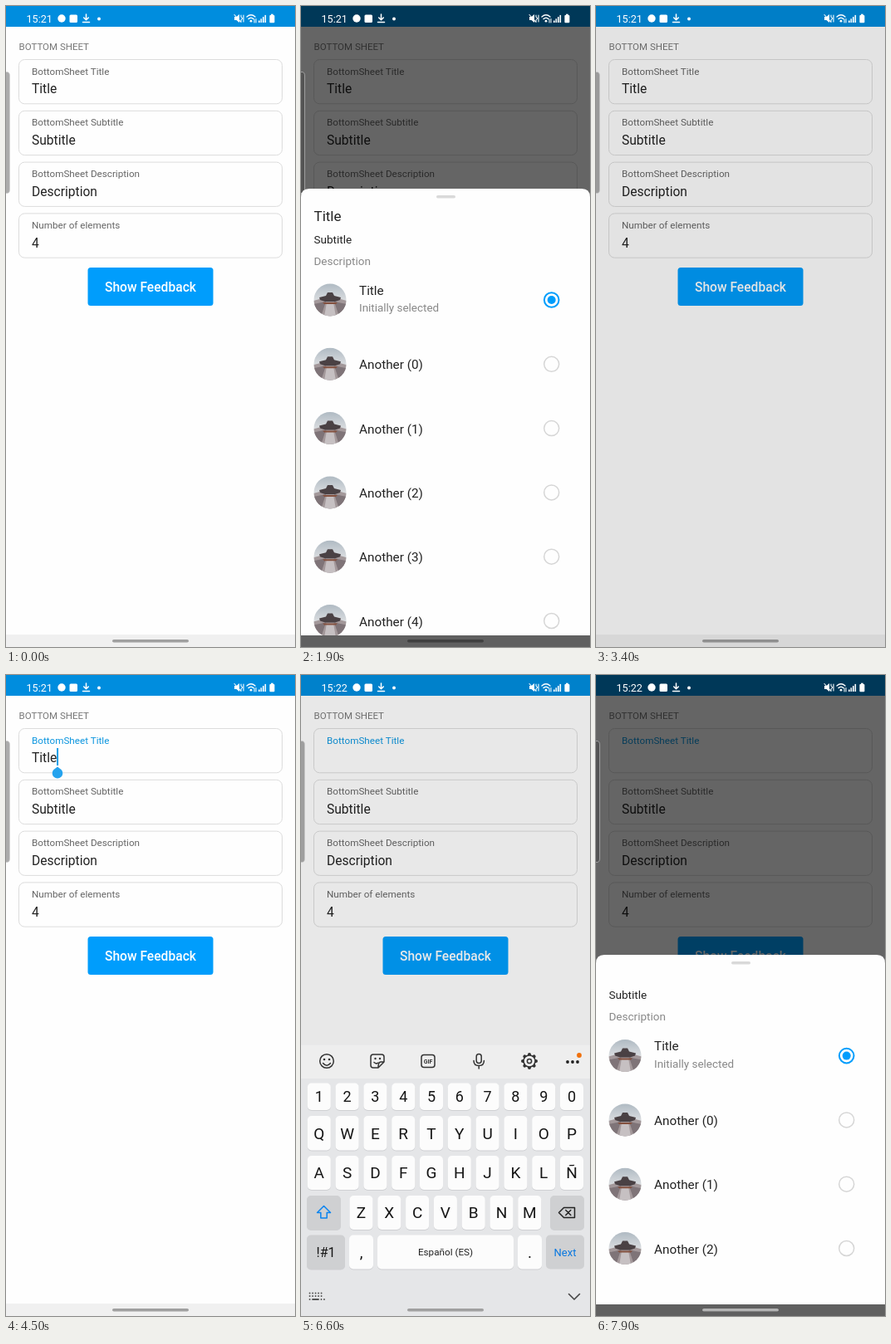
These frames come from a looping animation (348 by 772 pixels, 8 s). An HTML page:

```html
<!DOCTYPE html>
<html lang="en">
<head>
<meta charset="utf-8">
<title>Bottom sheet demo</title>
<style>
  html, body { margin: 0; width: 100%; height: 100%; overflow: hidden; background: #fefefe; }
  svg { display: block; width: 100vw; height: 100vh; font-family: Roboto, "Noto Sans", sans-serif; }
  .line { fill: none; stroke-linecap: round; stroke-linejoin: round; }
  .caps .letter { text-transform: uppercase; }
</style>
</head>
<body>
<svg id="stage" viewBox="0 0 348 772"></svg>
<script>
const LOOP = 8000;
const BLUE = '#009dfc';
const NAV_TOP = 758;

// Markup helpers; text is placed by the vertical centre of its capitals.
const text = (x, cy, size, str, fill = '#222', extra = '') =>
  `<text x="${x}" y="${cy + size * 0.36}" font-size="${size}" fill="${fill}" ${extra}>${str}</text>`;
const middle = (x, cy, size, str, fill, extra = '') =>
  text(x, cy, size, str, fill, `text-anchor="middle" ${extra}`);
const rect = (x, y, w, h, r, fill, extra = '') =>
  `<rect x="${x}" y="${y}" width="${w}" height="${h}" rx="${r}" fill="${fill}" ${extra}/>`;
const dot = (x, y, r, fill, extra = '') =>
  `<circle cx="${x}" cy="${y}" r="${r}" fill="${fill}" ${extra}/>`;
const line = (d, stroke, width = 1.5, extra = '') =>
  `<path class="line" d="${d}" stroke="${stroke}" stroke-width="${width}" ${extra}/>`;
const group = (id, body, extra = '') => `<g id="${id}" ${extra}>${body}</g>`;

function field(label, value, index) {
  const y = 64.5 + index * 61.8;
  return rect(15.5, y, 317, 53.3, 7, '#fefefe', 'stroke="#dcdcdc"') +
    text(31, y + 13.8, 11.7, label, '#666', `id="label${index}"`) +
    text(31, y + 35, 15.6, value, '#222', `id="value${index}"`);
}

function page() {
  const fields = [['BottomSheet Title', 'Title'], ['BottomSheet Subtitle', 'Subtitle'],
    ['BottomSheet Description', 'Description'], ['Number of elements', '4']];
  return rect(0, 0, 348, 772, 0, '#fefefe') +
    rect(0, 0, 348, 25, 0, '#008dde') +
    text(15.5, 49, 11.5, 'BOTTOM SHEET', '#777') +
    fields.map(([label, value], i) => field(label, value, i)).join('') +
    rect(98.5, 315, 151, 46, 3.5, BLUE) +
    middle(174, 338.5, 15.6, 'Show Feedback', '#fff', 'font-weight="500"') +
    group('cursor', rect(0, 88, 2, 21, 0, '#1b9fe8')) +
    group('handle', '<path d="M62 110.5L66.6 114A6.3 6.3 0 1 1 57.4 114Z" fill="#25a3ee"/>') +
    rect(0, NAV_TOP - 1, 348, 15, 0, '#f0f0f0');
}

const avatar = `<g id="avatar"><g clip-path="url(#round)">
  ${rect(-20, -20, 40, 40, 0, 'url(#sky)')}
  <path d="M-20 1L-9-2H9L20 1V20H-20Z" fill="#a3989a"/>
  <path d="M-20 5L-5 2L-11 20H-20ZM20 5L5 2L11 20H20Z" fill="#7f7478"/>
  <path d="M-13-3L-5-5L-3-9H3L5-5L13-3L12 0L6 2H-6L-12 0Z" fill="#4a4144"/>
  <path d="M-4 3H4L7 20H-7Z" fill="#c6c0c2"/>
  <path d="M-9 3L9 3L7 5H-7Z" fill="#84513f"/></g></g>`;

function row(index, cy) {
  const selected = index === 0;
  return `<use href="#avatar" x="35" y="${cy}"/>` + (selected
    ? text(70, cy - 12, 15.3, 'Title') + text(70, cy + 9.5, 13.45, 'Initially selected', '#888') +
      dot(301.7, cy, 8.8, 'none', `stroke="${BLUE}" stroke-width="2"`) + dot(301.7, cy, 5, BLUE)
    : text(70, cy + 0.5, 15.3, `Another (${index - 1})`) +
      dot(301.7, cy, 9, 'none', 'stroke="#d6d6d6" stroke-width="1.5"'));
}

function sheet(id, title, rowCount) {
  const shift = title ? 0 : -12.4;
  let body = '<path d="M0 10Q0 0 10 0H338Q348 0 348 10V560H0Z" fill="#fefefe"/>' +
    rect(163, 8, 23, 3.6, 1.8, '#d9d9d9') +
    text(15.5, 32.5, 17, title) +
    text(15.5, 61 + shift, 13.5, 'Subtitle') +
    text(15.5, 87 + shift, 13.5, 'Description', '#888');
  for (let i = 0; i < rowCount; i++) body += row(i, 134 + shift + i * 77.3);
  return `<g clip-path="url(#aboveNav)">${group(id, body)}</g>`;
}

function key(cx, y, w, h, label, size = 19, fill = '#fcfcfc', color = '#151515', extra = '') {
  return rect(cx - w / 2, y + 1, w, h, 5, '#cfd0d3') + rect(cx - w / 2, y, w, h, 5, fill, extra) +
    middle(cx, y + h / 2, size, label, color, 'class="letter"');
}

function toolbar() {
  const ink = '#333';
  const gear = Array.from({ length: 8 }, (_, i) =>
    `<path class="line" d="M0-7V-8" stroke="${ink}" stroke-width="4" transform="translate(275 465) rotate(${i * 45})"/>`).join('');
  return dot(31, 465, 8.3, 'none', `stroke="${ink}" stroke-width="1.5"`) +
    dot(28, 463, 1.3, ink) + dot(34, 463, 1.3, ink) + line('M26.5 467.5Q31 473 35.5 467.5', ink) +
    line('M87 457H97Q100 457 100 460V466L93 473H87Q84 473 84 470V460Q84 457 87 457ZM100 466H96Q93 466 93 473', ink) +
    dot(89.5, 462, 1.2, ink) + dot(95, 462, 1.2, ink) + line('M88 466.5Q91 469 93 467', ink) +
    rect(145, 457.5, 16, 15, 3, 'none', `stroke="${ink}" stroke-width="1.5"`) +
    middle(153, 465, 7, 'GIF', ink, 'font-weight="700"') +
    rect(211.2, 456.5, 6, 11, 3, 'none', `stroke="${ink}" stroke-width="1.5"`) +
    line('M208 464.5Q208 470.5 214.2 470.5T220.4 464.5M214.2 470.5V474', ink) +
    gear + dot(275, 465, 7, '#eee', `stroke="${ink}" stroke-width="1.5"`) +
    dot(275, 465, 2.6, 'none', `stroke="${ink}" stroke-width="1.5"`) +
    dot(335, 458, 2.9, '#f0700c');
}

function keyboard() {
  const gray = '#cfd0d2';
  const column = i => 21.8 + i * 33.8;
  const keys = (letters, first, y, h, size) => [...letters]
    .map((c, i) => key(column(i + first), y, 28, h, c, size)).join('');
  return rect(0, 445.5, 348, 330, 0, '#e5e6e8') + rect(0, 445.5, 348, 40.5, 0, '#eeeeee') +
    group('suggestions', line('M24 458L16 466L24 474', '#222', 1.6) +
      ['Título', 'Titular', 'Titulo'].map((word, i) => middle(86 + i * 88, 466, 16.4, word)).join('')) +
    group('toolbar', toolbar()) +
    [321, 327, 333].map(x => dot(x, 466, 1.9, '#222')).join('') +
    keys('1234567890', 0, 491.5, 32.5, 18) +
    keys('qwertyuiop', 0, 531, 41.5) +
    keys('asdfghjklñ', 0, 579, 41) +
    key(27.5, 627, 41, 41, '', 1, gray) +
    line('M27.5 639.5L35.5 647.5H31.2V654H23.8V647.5H19.5Z', '#222', 1.5, 'id="shift"') +
    keys('zxcvbnm', 1.5, 627, 41) +
    key(320.5, 627, 41, 41, '', 1, gray, '', 'id="backspace"') +
    line('M316.5 641.5H329.5V653.5H316.5L310.5 647.5ZM318.8 644.5L324.8 650.5M324.8 644.5L318.8 650.5', '#222') +
    key(30, 674.5, 46, 41, '!#1', 16, gray) +
    key(72.5, 674.5, 29, 41, ',') +
    rect(92, 675.5, 164, 41, 5, '#cfd0d3') + rect(92, 674.5, 164, 41, 5, '#fcfcfc') +
    middle(174, 695, 11.7, 'Español (ES)', '#222') +
    key(275.5, 674.5, 29, 41, '.') +
    rect(295, 674.5, 46, 41, 5, gray) + middle(318, 695, 13, 'Next', '#0a78e0') +
    line('M10.5 744.5H28M10.5 748H28', '#555', 1.8, 'stroke-dasharray="0.1 3.4"') +
    line('M10.5 752H28', '#555', 1.8, 'stroke-dasharray="0.1 3.4 7 3.4"') +
    line('M322.5 745.5L329 752L335.5 745.5', '#444', 1.6) +
    rect(128, 763, 92, 3.6, 1.8, '#a0a0a0');
}

function statusIcons() {
  const white = '#fff';
  const bars = [0, 1, 2, 3].map(i => rect(304 + i * 2.5, 17.5 - i * 2.2, 1.6, 2.5 + i * 2.2, 0, white)).join('');
  return text(24.5, 15.5, 12.6, '15:21', white, 'id="clock"') +
    dot(67, 15, 4.7, white) + rect(76.5, 10.5, 9.5, 9.5, 1.5, white) +
    line('M96.5 10V16.5M93.7 14L96.5 16.8L99.3 14M92.5 19.5H100.5', white, 1.5) +
    dot(112, 15.5, 2, white) +
    '<path d="M275 13H277.5L281 10V20L277.5 17H275Z" fill="#fff"/>' +
    line('M275 10.5L283 19.5M283 11V13L284.8 15L283 17V19M286 11V19', white, 1.1) +
    line('M290 13Q295 8.6 300 13M292 15.6Q295 13 298 15.6', white, 1.4) +
    dot(295, 18.2, 1.4, white) + line('M299 16V20M301 15.5V20', white, 1) +
    bars + rect(317.4, 11, 6, 9.2, 1, white) + rect(319, 9.7, 2.8, 2, 0, white);
}

const stage = document.getElementById('stage');
stage.innerHTML = `<defs>
  <clipPath id="round">${dot(0, 0, 19.5, '#000')}</clipPath>
  <clipPath id="aboveNav">${rect(0, 0, 348, NAV_TOP, 0, '#000')}</clipPath>
  <linearGradient id="sky" x2="0" y2="1"><stop stop-color="#aeb9c2"/><stop offset=".5" stop-color="#d9dcdf"/></linearGradient>
  ${avatar}</defs>` +
  page() +
  rect(128, 763, 92, 3.6, 1.8, '#a0a0a0') +
  rect(0, 0, 348, 772, 0, '#000', 'id="dim"') +
  '<path d="M-1 79.5H1Q4.5 79.5 4.5 84V221Q4.5 225.5 1 225.5H-1Z" fill="#3c3c3c" fill-opacity=".43" stroke="#ccc" stroke-opacity=".6"/>' +
  sheet('tallSheet', 'Title', 6) + sheet('shortSheet', '', 4) +
  rect(128, 763, 92, 3.6, 1.8, '#b4b4b4', 'id="lightPill"') +
  group('keyboard', keyboard()) + statusIcons();

const parts = {};
stage.querySelectorAll('[id]').forEach(el => parts[el.id] = el);

const progress = (t, start, duration) => Math.min(1, Math.max(0, (t - start) / duration));
const easeOut = p => 1 - (1 - p) ** 3;
const easeIn = p => p * p;
const between = (t, a, b) => t >= a && t < b;
const show = (el, on) => el.setAttribute('visibility', on ? 'visible' : 'hidden');
const slide = (el, y) => {
  show(el, y < 772);
  el.setAttribute('transform', `translate(0 ${y})`);
};

function draw(t) {
  const dim = progress(t, 1650, 220) - progress(t, 3220, 220) + progress(t, 6570, 220);
  parts.dim.setAttribute('opacity', 0.6 * dim);

  const tallShown = easeOut(progress(t, 1650, 240)) - easeIn(progress(t, 3220, 165));
  slide(parts.tallSheet, 772 - 552 * tallShown);
  slide(parts.shortSheet, 772 - 435 * easeOut(progress(t, 6600, 280)));
  show(parts.lightPill, between(t, 2000, 3220) || t >= 7000);

  const keysShown = easeOut(progress(t, 4600, 250)) - easeIn(progress(t, 6650, 230));
  slide(parts.keyboard, 327 * (1 - keysShown));
  parts.keyboard.setAttribute('visibility', keysShown > 0 ? 'visible' : 'hidden');

  // One letter goes every 100 ms while backspace is held.
  const deleted = t < 5300 ? 0 : Math.min(5, Math.floor((t - 5300) / 100) + 1);
  const value = 'Title'.slice(0, 5 - deleted);
  if (parts.value0.textContent !== value) parts.value0.textContent = value;
  const valueWidth = value ? parts.value0.getComputedTextLength() : 0;
  parts.cursor.setAttribute('transform', `translate(${30.8 + valueWidth} 0)`);
  show(parts.cursor, between(t, 4400, 4900) || between(t, 5300, 6200));
  show(parts.handle, between(t, 4400, 5300));
  parts.label0.setAttribute('fill', t >= 4400 ? '#0d96df' : '#666');

  const caps = t >= 5750;
  parts.keyboard.classList.toggle('caps', caps);
  parts.suggestions.style.display = caps ? 'none' : '';
  parts.toolbar.style.display = caps ? '' : 'none';
  parts.shift.setAttribute('stroke', caps ? '#0a84f0' : '#222');
  parts.backspace.setAttribute('fill', between(t, 5250, 5750) ? '#a2a2a4' : '#cfd0d2');
  parts.clock.textContent = t >= 6200 ? '15:22' : '15:21';
}

const begin = performance.now();
function tick() {
  draw((performance.now() - begin) % LOOP);
  requestAnimationFrame(tick);
}
tick();
</script>
</body>
</html>
```
